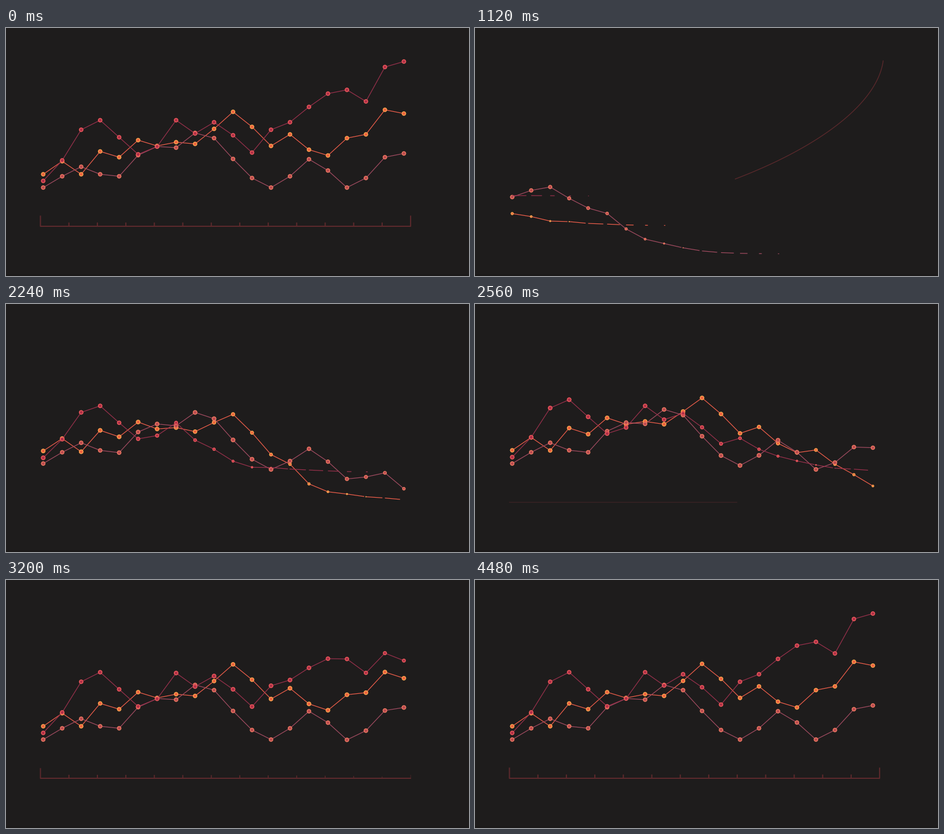
Write a matplotlib script that moves like this. It is 800 by 429 pixels and loops after 5520 ms.

```python
import numpy as np
import matplotlib.pyplot as plt
from matplotlib.animation import FuncAnimation
from matplotlib.collections import LineCollection
from matplotlib.patches import Rectangle

W, H, DPI = 800, 429, 64
STEP, LOOP = 40, 5520
PX = 72 / DPI          # points per pixel
STAGGER = 80           # delay between neighbouring points, ms
BG, AXIS = "#1e1c1c", "#5c292c"

X = 63.8 + 32.8 * np.arange(20)
ORANGE = [252.5, 230, 252.5, 213, 223, 193.5, 203.5, 197, 200, 174,
          144.5, 170.5, 203.5, 183.5, 210, 220, 190, 183.5, 141, 147.5]
PINK = [275.5, 256, 239.5, 252.5, 256, 219.5, 204.5, 206.5, 181, 190,
        226, 259, 275.5, 256, 226.5, 246, 275.5, 259, 223, 216.5]
CRIMSON = [264, 228.5, 175.5, 159, 188.5, 218, 204.5, 159, 182, 162.5,
           185, 215, 175.5, 162.5, 136, 113, 106.5, 126.5, 67, 57.5]

# cubic-bezier(.606, 0, 0, 1) as a lookup
_s = np.linspace(0, 1, 2001)
_ex = 1.818 * _s * (1 - _s) ** 2 + _s ** 3
_ey = 3 * _s ** 2 - 2 * _s ** 3


def ease(x):
    return np.interp(x, _ex, _ey)


def swoosh(a, b):
    """Part of the rising curve between parameters a and b."""
    s = np.linspace(a, b, 90)[:, None]
    p0, p1, p2, p3 = np.array([(59, 343), (400, 320), (700, 179), (705.5, 48)])
    return ((1 - s) ** 3 * p0 + 3 * (1 - s) ** 2 * s * p1
            + 3 * (1 - s) * s ** 2 * p2 + s ** 3 * p3)


fig = plt.figure(figsize=(W / DPI, H / DPI), dpi=DPI, facecolor=BG)
ax = fig.add_axes([0, 0, 1, 1])
ax.set_xlim(-0.5, W - 0.5)
ax.set_ylim(H - 0.5, -0.5)
ax.axis("off")
ax.add_patch(Rectangle((-1, 425.5), W + 2, 5, color="#1b1919", lw=0))


def strokes(color, width, z):
    lines = LineCollection([], colors=color, linewidths=width * PX, zorder=z)
    lines.set_snap(False)
    return ax.add_collection(lines)


class Series:
    def __init__(self, final, base, delay, line, ring, core, z):
        self.final, self.base, self.delay = np.array(final), base, delay
        self.lines = strokes(line, 1.2, z)
        self.rings = self.dots(ring, z + 0.1)
        self.cores = self.dots(core, z + 0.2)

    @staticmethod
    def dots(color, z):
        d = ax.scatter(X, X, s=0, c=color, linewidths=0, zorder=z)
        d.set_snap(False)
        return d

    def update(self, t):
        age = (t - self.delay) / STAGGER - np.arange(20)
        y = self.base + (self.final - self.base) * ease((age + 0.1) / 27.1)
        pts = np.column_stack([X, y])

        grow = ease((age[:-1] + 3) / 15)
        ends = pts[:-1] + (pts[1:] - pts[:-1]) * grow[:, None]
        self.lines.set_segments(
            [(p, q) for p, q, g in zip(pts, ends, grow) if g > 0.03])

        swell = 0.2 * np.sin(np.pi * np.clip((age - 9) / 16, 0, 1))
        r = 3.85 * (1 - np.exp(-0.3 * np.maximum(age - 4, 0))) + swell
        for dots, radius in ((self.rings, r), (self.cores, r - 1.4)):
            dots.set_offsets(pts)
            dots.set_sizes((2 * PX * np.maximum(radius, 0)) ** 2)


series = [
    Series(ORANGE, 341, 480, "#f4604c", "#fba64f", "#f0603f", 3),
    Series(PINK, 390, 0, "#a64d63", "#ef7b62", "#bb4a50", 4),
    Series(CRIMSON, 290, 840, "#9c314d", "#ef5b5c", "#b02f47", 5),
]

curve = strokes(AXIS, 1.3, 1)
baseline = strokes(AXIS, 2, 1)
ticks = strokes(AXIS, 2, 1)

TICK = np.arange(14)
TICK_X = 59 + 49.2 * TICK
TICK_H = np.where(TICK % 13 == 0, 18.5, 6.5)


def draw_curve(t):
    head, tail = ease(t / 1431), ease((t - 816) / 900)
    curve.set_segments([swoosh(tail, head)] if head - tail > 0.001 else [])


def draw_axis(t):
    p = ease((t - 2180) / 1000)
    width = 2 * ease((t - 2240) / 1000)
    baseline.set_segments([[(58.3, 342.5), (58.3 + 641 * p, 342.5)]]
                          if width > 0.02 else [])
    baseline.set_linewidths([max(width, 0.02) * PX])

    p = ease((t - 2525 - 27.3 * TICK) / 1000)
    on = p > 0.02
    ticks.set_segments([[(x, 342.5), (x, 342.5 - h)]
                        for x, h in zip(TICK_X[on], (TICK_H * p)[on])])
    ticks.set_linewidths(2 * PX * p[on] if on.any() else [PX])


def update(frame):
    t = frame * STEP if frame else LOOP
    for s in series:
        s.update(t)
    draw_curve(t)
    draw_axis(t)
    return []


anim = FuncAnimation(fig, update, frames=LOOP // STEP, interval=STEP,
                     init_func=lambda: update(0), repeat=True, blit=False)
plt.show()
```
